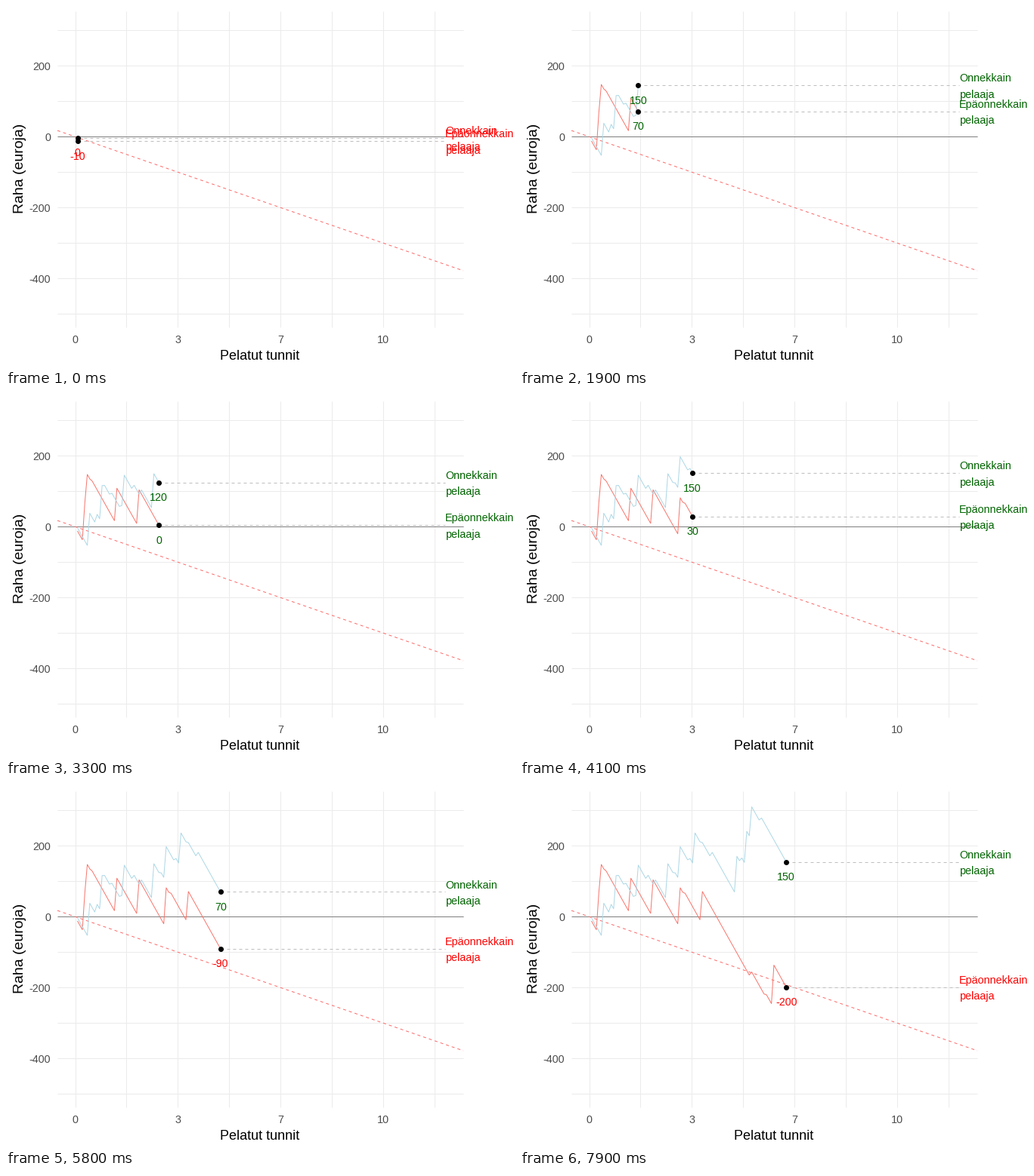
A matplotlib script that plays this animation: 672x480 px, repeating every 8000 ms.

```python
import matplotlib.pyplot as plt
import numpy as np
from matplotlib.animation import FuncAnimation

W, H, DPI = 672, 480, 96
PX = 72 / DPI
STEPS = 80
LEFT, RIGHT, TOP, BOTTOM = 68, 605, 7, 426
X0, HOUR, STEP, Y0, EURO = 91.55, 40.74, 3.262, 173.3, 0.47
GREEN, RED = "#006400", "#ff0000"

# every step costs the bet; a few steps pay out {step: euros}
BET = 12.4
LUCKY = {5: 103, 8: 34, 10: 106, 11: 13, 14: 15, 18: 15, 19: 98, 23: 21,
         26: 24, 31: 108, 34: 11, 36: 99, 40: 16, 42: 97, 45: 10, 49: 22,
         59: 113, 61: 20, 63: 100, 65: 94, 69: 18}
UNLUCKY = {3: 117, 4: 92, 6: 6, 16: 104, 25: 107, 36: 114, 38: 9, 45: 92,
           65: 21, 71: 10, 74: 121}

plt.rcParams["font.family"] = "Liberation Sans"

fig = plt.figure(figsize=(W / DPI, H / DPI), dpi=DPI, facecolor="white")
ax = fig.add_axes([0, 0, 1, 1])
ax.set(xlim=(0, W), ylim=(H, 0))
ax.axis("off")


def to_y(euros):
    return Y0 - EURO * euros


def line(xs, ys, color, z, **kw):
    return ax.plot(xs, ys, color=color, lw=PX, zorder=z,
                   solid_capstyle="butt", **kw)[0]


def text(x, y, s, size, color="black", ha="center", **kw):
    return ax.text(x, y, s, fontsize=size * PX, color=color, ha=ha,
                   va="baseline", **kw)


def draw_axes():
    for euros in range(-500, 301, 100):
        line([LEFT, RIGHT], [to_y(euros)] * 2, "#ebebeb", 1)
    for k in range(8):
        line([X0 + k * HOUR * 5 / 3] * 2, [TOP, BOTTOM], "#ebebeb", 1)
    for euros in range(-400, 201, 200):
        text(59, to_y(euros) + 5.6, str(euros), 14.4, "#4d4d4d", "right")
    for hours in np.linspace(0, 10, 4):
        text(X0 + hours * HOUR, 447, f"{hours:.0f}", 14.4, "#4d4d4d")
    text(336, 469, "Pelatut tunnit", 18)
    text(23.5, 215.3, "Raha (euroja)", 19.4, rotation=90,
         rotation_mode="anchor")
    line([LEFT, RIGHT], [Y0, Y0], "#7f7f7f", 2)
    # expected loss: 30 euros an hour
    ends = np.array([LEFT, RIGHT])
    line(ends, to_y(-30 * (ends - X0) / HOUR), "#ff6a6a", 2, dashes=(4, 4))


class Player:
    def __init__(self, name, start, wins, color):
        steps = np.arange(STEPS)
        paid = np.cumsum([wins.get(s, 0) for s in steps])
        self.balance = start - BET * steps + paid
        self.x = 94.5 + STEP * steps
        self.y = to_y(self.balance)
        self.path = line([], [], color, 3)
        self.guide = line([], [], "#bebebe", 4, dashes=(4, 4))
        self.dot = ax.plot([], [], "o", color="black", ms=7 * PX, mew=0,
                           zorder=5)[0]
        self.value = text(0, 0, "", 14.3, zorder=6)
        self.lines = [text(581, 0, s, 14.3, ha="left", zorder=6)
                      for s in (name, "pelaaja")]

    def show(self, i):
        x, y, euros = self.x[i], self.y[i], self.balance[i]
        self.path.set_data(self.x[:i + 1], self.y[:i + 1])
        self.guide.set_data([x, 581], [y, y])
        self.dot.set_data([x], [y])
        self.value.set_text(str(int(round(euros / 10)) * 10))
        self.value.set_position((x, y + 24.6))
        for label, dy in zip(self.lines, (-4.6, 16.6)):
            label.set_y(y + dy)
        for label in (self.value, *self.lines):
            label.set_color(GREEN if euros > 0 else RED)


draw_axes()
players = [Player("Epäonnekkain", -12, UNLUCKY, "#f8766d"),
           Player("Onnekkain", -3, LUCKY, "#add8e6")]


def update(i):
    for player in players:
        player.show(i)
    return []


anim = FuncAnimation(fig, update, frames=STEPS, interval=100, repeat=True,
                     repeat_delay=0, blit=False)
plt.show()
```
